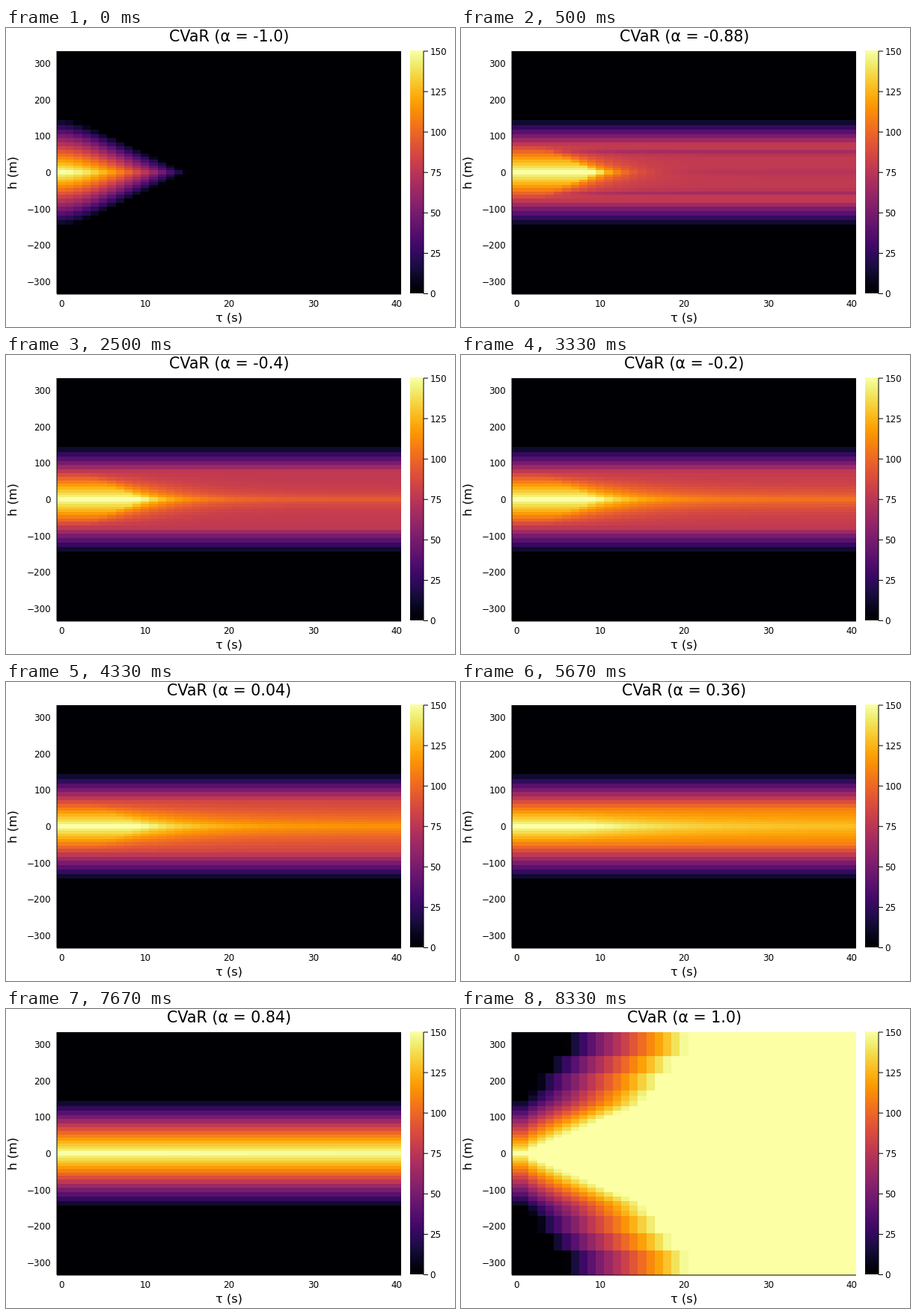
Animation, 600 px wide and 400 px high, one loop 8490 ms. Source, as a matplotlib script:

```python
import numpy as np
import matplotlib.pyplot as plt
from matplotlib.animation import FuncAnimation

FRAMES, LOOP_MS = 51, 8490
LEFT, RIGHT, TOP, BOTTOM = 68, 528, 31, 355.5
MID_Y = (TOP + BOTTOM) / 2
PX_PER_M = 0.487
COLUMNS = 41
PEAK = 150
TITLE_PX, LABEL_PX, TICK_PX = 20.7, 16.3, 11.85
plt.rcParams["font.family"] = "DejaVu Sans"

# Cell borders: fine rows near h = 0, three coarse rows on each side.
k = np.arange(1, 18)
half = np.r_[2.73 * k + 0.13 * k**2, 107, 130, (BOTTOM - TOP) / 2]
row_edges = MID_Y + np.r_[-half[::-1], half]
col_edges = np.linspace(LEFT, RIGHT, COLUMNS + 1)
centers = (row_edges[1:] + row_edges[:-1]) / 2
h = np.abs(centers - MID_Y)[:, None] / PX_PER_M
tau = np.arange(COLUMNS)[None, :]
base = np.maximum(PEAK - h, 0)


def best_case():
    end = 1.3 + 0.092 * base
    return base * np.clip(1 - (tau / end) ** 1.65, 0, 1)


def worst_case():
    start = 1 + 0.032 * np.maximum(h - 145, 0)
    full = np.maximum(np.interp(h, [0, 137, 300], [0.5, 14.9, 20.3]), start + 0.5)
    rise = np.clip((tau - start) / (full - start), 0, 1) ** 0.85
    return base + (PEAK - base) * rise


def risk(alpha):
    """Cost over (h, tau): a near-term wedge fading to a long-term plateau."""
    if alpha <= -1:
        return best_case()
    if alpha >= 1:
        return worst_case()
    near = base + 6 * np.sin(np.pi * np.minimum(h, 100) / 100)
    dip = 25 * max(-0.4 - alpha, 0) * np.exp(-(((h - 55) / 6) ** 2))
    floor = 77 - dip
    center = min(80 + 43 * (alpha + 0.72), PEAK)
    width = 45 * np.exp(2 * alpha)
    plateau = floor + (center - floor) * np.exp(-((h / width) ** 1.2))
    far = np.minimum(plateau, near)
    hold = np.maximum(9.5 - 0.1 * h, 1)
    fade = np.exp(-np.maximum(tau - hold, 0) / (7 * np.exp(0.85 * alpha)))
    return far + (near - far) * fade


fig = plt.figure(figsize=(6, 4), dpi=100, facecolor="white")
ax = fig.add_axes([0, 0, 1, 1])


def label(x, y, text, px, **kw):
    style = dict(ha="center", va="center_baseline", color="black") | kw
    return ax.text(x, y, text, fontsize=px * 0.72, **style)


def line(xs, ys, width=1):
    ax.plot(xs, ys, color="black", lw=width * 0.72, snap=False,
            solid_capstyle="butt")


mesh = ax.pcolormesh(col_edges, row_edges, risk(-1), cmap="inferno",
                     vmin=0, vmax=PEAK, antialiased=False)
ax.imshow(np.linspace(1, 0, 256)[:, None], cmap="inferno", aspect="auto",
          extent=(540, 558, BOTTOM, TOP), interpolation="nearest")
ax.set(xlim=(0, 600), ylim=(400, 0))
ax.axis("off")

line([LEFT, RIGHT], [BOTTOM + 0.5] * 2)
line([LEFT, LEFT], [TOP, BOTTOM])
line([558, 558], [TOP, BOTTOM])

for value in range(0, 41, 10):
    x = LEFT + (value + 0.5) * (RIGHT - LEFT) / COLUMNS
    label(x, 368, str(value), TICK_PX)
for value in range(-300, 301, 100):
    text = str(value).replace("-", "\u2212")
    label(60, MID_Y - 0.3 - value * PX_PER_M, text, TICK_PX, ha="right")
for value in range(0, 151, 25):
    y = BOTTOM - value / PEAK * (BOTTOM - TOP)
    line([558, 564], [y, y])
    label(566.5, y - 0.3, str(value), TICK_PX, ha="left")

label(298, 386.5, "τ (s)", LABEL_PX)
label(10, MID_Y, "h (m)", LABEL_PX, rotation=90, va="center")
title = label(298.3, 18, "", TITLE_PX, va="baseline")


def update(i):
    alpha = (i - 25) / 25
    mesh.set_array(risk(alpha))
    title.set_text(f"CVaR (α = {round(alpha, 2)})")
    return mesh, title


anim = FuncAnimation(fig, update, frames=FRAMES, interval=LOOP_MS / FRAMES,
                     repeat=True, repeat_delay=0)
plt.show()
```
